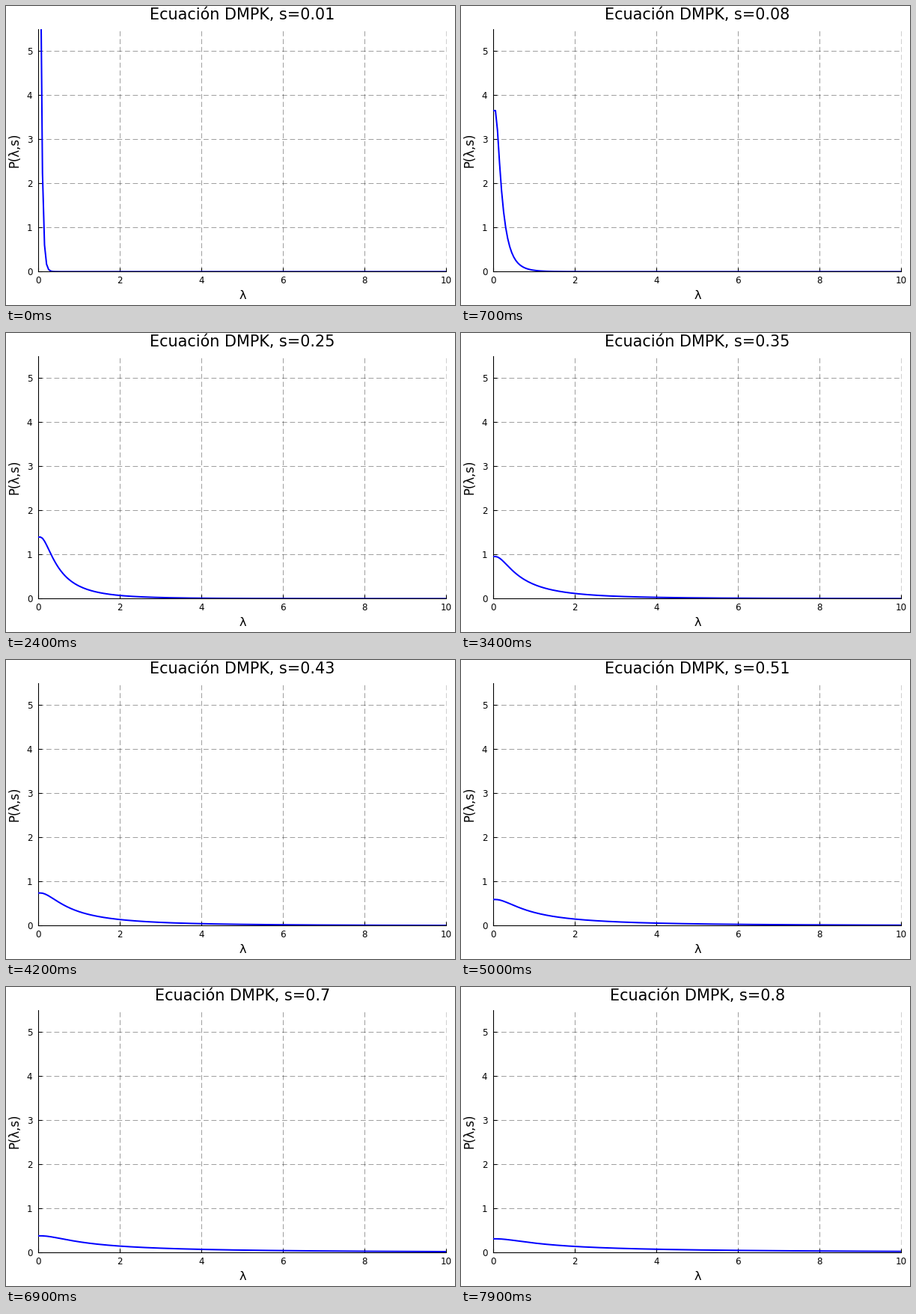
Animation of 600x400 px, one loop 8000 ms. Source, as a matplotlib script:

```python
import numpy as np
import matplotlib.pyplot as plt
from matplotlib.animation import FuncAnimation

W, H, DPI = 600, 400, 100
FRAMES, INTERVAL = 80, 100
PX = 72 / DPI  # points per pixel
LEFT, RIGHT, TOP, BOTTOM = 43.3, 588.3, 30.7, 355.4

plt.rcParams["font.family"] = "DejaVu Sans"

STEP = 0.05
x = np.linspace(0, 10, 201)


def density(s):
    """Hyperbolic heat kernel with a rounded top, flat over the first cell."""
    peak = 1 / (0.118 + 1.74 * s + 2.62 * s**2)
    t = 0.02 + 1.7 * s + 1.6 * s**3
    b = 0.57 * s
    u = np.maximum(x - STEP, 0)
    q = u - b * (1 - np.exp(-u / b))
    r = 2 * np.arcsinh(np.sqrt(np.maximum(q, 1e-9)))
    return peak * np.sqrt(r / np.sinh(r)) * np.exp(-r**2 / (4 * t))


fig = plt.figure(figsize=(W / DPI, H / DPI), dpi=DPI, facecolor="white")
ax = fig.add_axes([LEFT / W, 1 - BOTTOM / H, (RIGHT - LEFT) / W, (BOTTOM - TOP) / H])
ax.set(xlim=(0, 10), ylim=(0, 5.5), xticks=range(0, 11, 2), yticks=range(6))
ax.spines[["top", "right"]].set_visible(False)
ax.spines[["left", "bottom"]].set_linewidth(1.1 * PX)
ax.tick_params(direction="in", length=5 * PX, width=1.1 * PX, labelsize=11.9 * PX)
ax.tick_params(axis="x", pad=6 * PX)
ax.tick_params(axis="y", pad=8 * PX)
ax.grid(color="black", alpha=0.5, linewidth=0.75 * PX, dashes=(9, 5))
ax.get_xgridlines()[-1].set(clip_on=False, alpha=0.25)
ax.set_axisbelow(True)


def label(px, py, text, size, **kw):
    return fig.text(px / W, 1 - py / H, text, fontsize=size * PX, ha="center", **kw)


label(316, 392, "λ", 16.3, va="baseline")
label(11, 193, "P(λ,s)", 16.5, va="center", rotation=90)
title = label(316, 18.3, "", 20.8, va="baseline")
curve, = ax.plot([], [], color="blue", linewidth=2 * PX, zorder=3)


def draw(i):
    s = round(0.01 * (i + 1), 2)
    title.set_text(f"Ecuación DMPK, s={s}")
    curve.set_data(x, density(s))
    return title, curve


anim = FuncAnimation(fig, draw, frames=FRAMES, interval=INTERVAL, repeat=True, repeat_delay=0)
plt.show()
```
